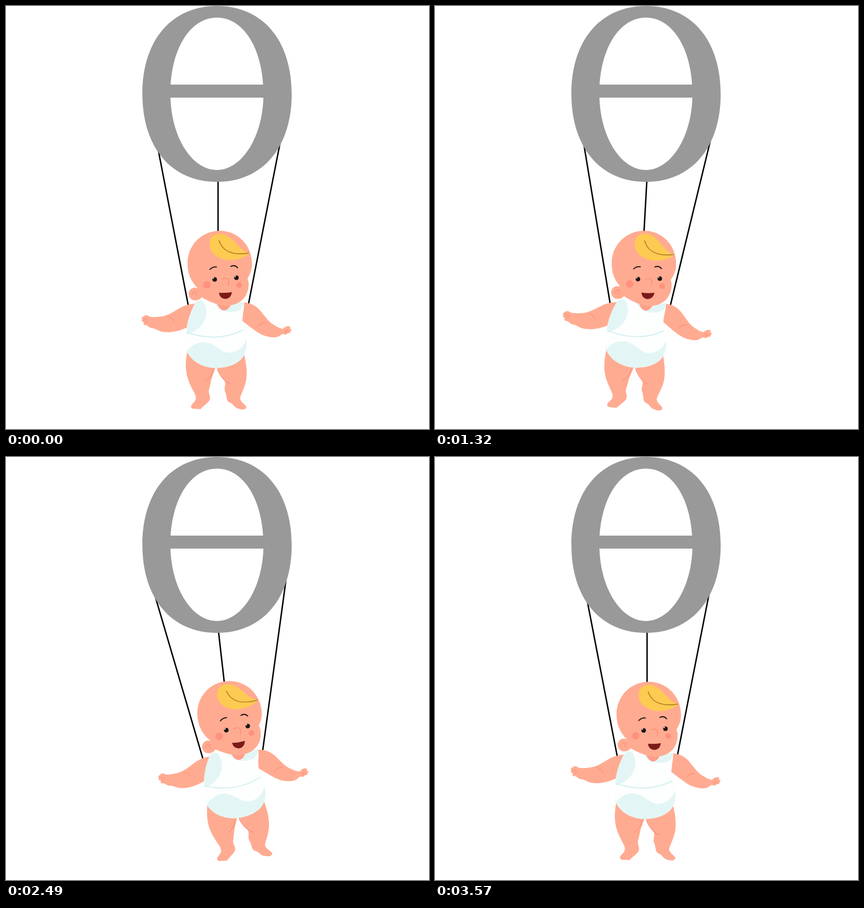
Recreate the animation shown at these times as an HTML page with a canvas. Size 748 by 748 pixels, loop 3600 ms.

```html
<!DOCTYPE html>
<html lang="en">
<head>
<meta charset="utf-8">
<title>Swinging baby</title>
<style>
html, body { margin: 0; width: 100%; height: 100%; overflow: hidden; background: #fff; }
canvas { display: block; width: 748px; height: 748px; }
</style>
</head>
<body>
<canvas id="stage" width="748" height="748"></canvas>
<script>
const ctx = document.getElementById('stage').getContext('2d');
const LOOP = 3600, STEP = 30;
const PIVOT = { x: 375, y: 302 };
const SKIN = '#ffab91', CREASE = '#fb8f7c', WHITE = '#fdffff', MINT = '#e3f6f5';

// Swing angle in degrees over time in ms, linear between keys.
const SWING = [[0, 0], [540, 4], [850, 6.25], [1020, 5.3], [1620, 1.1], [1740, 0], [2160, -3.4],
  [2490, -6.5], [2640, -8.1], [2700, -7.8], [3060, -4.8], [3240, -3.1], [3570, 0], [3600, 0]];

function swingAt(t) {
  const i = SWING.findIndex(key => key[0] > t);
  const [t0, a0] = SWING[i - 1], [t1, a1] = SWING[i];
  return a0 + (a1 - a0) * (t - t0) / (t1 - t0);
}

function fill(path, color) {
  ctx.fillStyle = color;
  ctx.fill(new Path2D(path));
}

function stroke(path, color, width) {
  ctx.strokeStyle = color;
  ctx.lineWidth = width;
  ctx.stroke(new Path2D(path));
}

function dot(x, y, r, color) {
  ctx.fillStyle = color;
  ctx.beginPath();
  ctx.arc(x, y, r, 0, Math.PI * 2);
  ctx.fill();
}

// Closed oval whose roundness k can differ between upper and lower half.
function oval(cx, cy, rx, ry, kTop, kBottom = kTop) {
  const l = cx - rx, r = cx + rx, t = cy - ry, b = cy + ry;
  const half = (from, to, edge, k) =>
    `C${from} ${cy + (edge - cy) * k} ${cx + (from - cx) * k} ${edge} ${cx} ${edge}` +
    `S${to} ${cy + (edge - cy) * k} ${to} ${cy}`;
  return `M${l} ${cy}${half(l, r, t, kTop)}${half(r, l, b, kBottom)}Z`;
}

const RING = new Path2D(oval(373.2, 155.5, 132, 155.5, 0.61) + oval(373, 155.3, 82.3, 134.7, 0.58, 0.55));

function drawTheta() {
  ctx.fillStyle = '#999';
  ctx.fill(RING, 'evenodd');
  ctx.fillRect(285, 139, 176, 23);
}

function drawString(topX, bottomX, bottomY, angle) {
  const a = angle * Math.PI / 180, dx = bottomX - PIVOT.x, dy = bottomY - PIVOT.y;
  const x = PIVOT.x + dx * Math.cos(a) - dy * Math.sin(a);
  const y = PIVOT.y + dx * Math.sin(a) + dy * Math.cos(a);
  const topY = 230, extend = 0.04;
  stroke(`M${topX + (topX - x) * extend} ${topY + (topY - y) * extend}L${x} ${y}`, '#000', 2.5);
}

function drawStrings(angle) {
  const spread = Math.abs(angle);
  drawString(264.5 - spread * (angle > 0 ? 1.15 : 0.85), 322, 528, angle);
  drawString(487 + spread * (angle > 0 ? 0.6 : 0.98), 429, 526, angle);
}

function drawLimbs() {
  // arms
  fill('M336 526C325 527 315 529 306 535C294 542 285 548 274 549C266 550 259 551 253 549' +
    'C249 546 245 546 244 549C241 549 239 552 241 554C239 557 241 559 244 559C242 563 244 565 247 564' +
    'C251 565 254 570 260 570C266 571 271 576 280 576.5C294 578 309 574 323 567Z', SKIN);
  fill('M420 524C434 525 443 531 449 538C456 546 461 554 468 560C476 566 484 570 490 571' +
    'C493 567 498 565 502 567C504 569 502 570 501 571C505 570 506 573 503 575C504 578 501 579 498 578' +
    'C497 583 493 580 489 580C485 582 482 586 474 586C463 586 452 582 442 575C433 569 425 562 418 557Z', SKIN);
  stroke('M286 549Q294 551 297 558', CREASE, 1.2);
  stroke('M446 566Q451 559 460 560', CREASE, 1.2);
  stroke('M244 553L251 556M245 559L251 559M492 575L498 573M494 577L499 576', CREASE, 1);
  // legs
  fill('M321 608C317 629 317 644 321 657C324 668 330 678 334 686C337 693 336 697 333 700' +
    'C329 704 327 706 327 709C328 714 338 712 344 713C348 708 357 702 360 697' +
    'C363 690 357 685 359 678C362 669 362 661 366 652L373 632Z', SKIN);
  fill('M371 636C375 646 381 655 386 662C390 668 385 675 387 681C391 688 389 699 395 701' +
    'C403 704 404 711 411 712C416 714 424 715 425 709C423 704 415 701 414 694C415 686 422 677 425 660' +
    'C427 644 424 628 420 612Z', SKIN);
  stroke('M366 642Q365 656 352 664', CREASE, 1.2);
  stroke('M374 643Q382 662 396 668', CREASE, 1.2);
}

function drawSuit() {
  fill('M334 526C343 517 355 520 365 524L396 533L421 523C422 536 417 548 418 559C419 570 425 580 426 592' +
    'C427 609 421 621 412 628C401 636 388 640 371 640C351 640 330 630 321 612C318 600 319 589 319 577' +
    'C320 557 327 541 334 526Z', WHITE);
  fill('M334 526C339 519 345 519 349 523C356 533 357 547 349 560C342 571 331 578 319 581C319 560 326 541 334 526Z', MINT);
  fill('M368 525C376 541 393 543 408 540C415 538 420 534 421 523L400 526Z', MINT);
  fill('M320 597L319 609C326 628 348 640 371 640C389 640 404 635 413 627C423 619 427 606 425 589' +
    'C421 602 411 611 398 613C382 615 372 598 354 595C341 593 328 599 320 611Z', MINT);
  stroke('M322 578Q376 595 419 573', '#d7f0f0', 2);
  // neck
  fill('M373 526Q378 538.5 386 538.5Q394 537.5 398 527Z', '#ff9f88');
}

function drawHead() {
  fill('M378 397.5C410 397.5 435 423 435 456C435 466 432 474 427 482C431 491 429 503 424 512' +
    'C418 523 404 530 390 530C375 529.5 360 523 346 515C342 521 332 523 326 517C320 509 324 499 333 498' +
    'C336 498 338 499 339 499C327 487 321 473 321 455C321 423 346 397.5 378 397.5Z', SKIN);
  stroke('M339 506Q331 502 329 511M334 507Q338 508 337 513', CREASE, 1.2);
  // hair
  fill('M431 437C420 447 404 450 391 449C374 447 358 436 360 418C361 408 369 402 380 403' +
    'C398 405 406 421 416 429C421 433 426 436 431 437Z', '#fdca52');
  stroke('M377 415C382 431 397 442 429 437', '#a97820', 1.5);
  // face
  dot(355, 493, 6.6, '#ff917f');
  dot(412.5, 493.5, 5, '#ff917f');
  stroke('M360.5 466Q365 461 372 461.5', '#1c1210', 1.8);
  stroke('M397.5 460.5Q405 457 409.5 463', '#1c1210', 1.8);
  for (const [x, y] of [[369, 483.5], [407.5, 480.5]]) {
    dot(x, y, 4, '#1c1210');
    dot(x - 2, y - 2.2, 1.1, '#fff');
  }
  stroke('M382 483Q386 480 391 482Q396 486 393 494', '#fa8d78', 1.4);
  fill('M376.5 507Q388 508 399.5 506Q398 517 388 518Q378 517.5 376.5 507Z', '#7a1b1a');
}

function render(now) {
  const t = Math.floor((now % LOOP) / STEP) * STEP;
  const angle = swingAt(t);
  ctx.fillStyle = '#fff';
  ctx.fillRect(0, 0, 748, 748);
  drawStrings(angle);

  ctx.save();
  ctx.translate(PIVOT.x, PIVOT.y);
  ctx.rotate(angle * Math.PI / 180);
  ctx.translate(-PIVOT.x, -PIVOT.y);
  stroke(`M${PIVOT.x} ${PIVOT.y}V400`, '#000', 2.5);
  drawLimbs();
  drawSuit();
  drawHead();
  ctx.restore();

  drawTheta();
}

ctx.lineCap = 'round';
const start = performance.now();
function tick() {
  render(performance.now() - start);
  requestAnimationFrame(tick);
}
tick();
</script>
</body>
</html>
```
